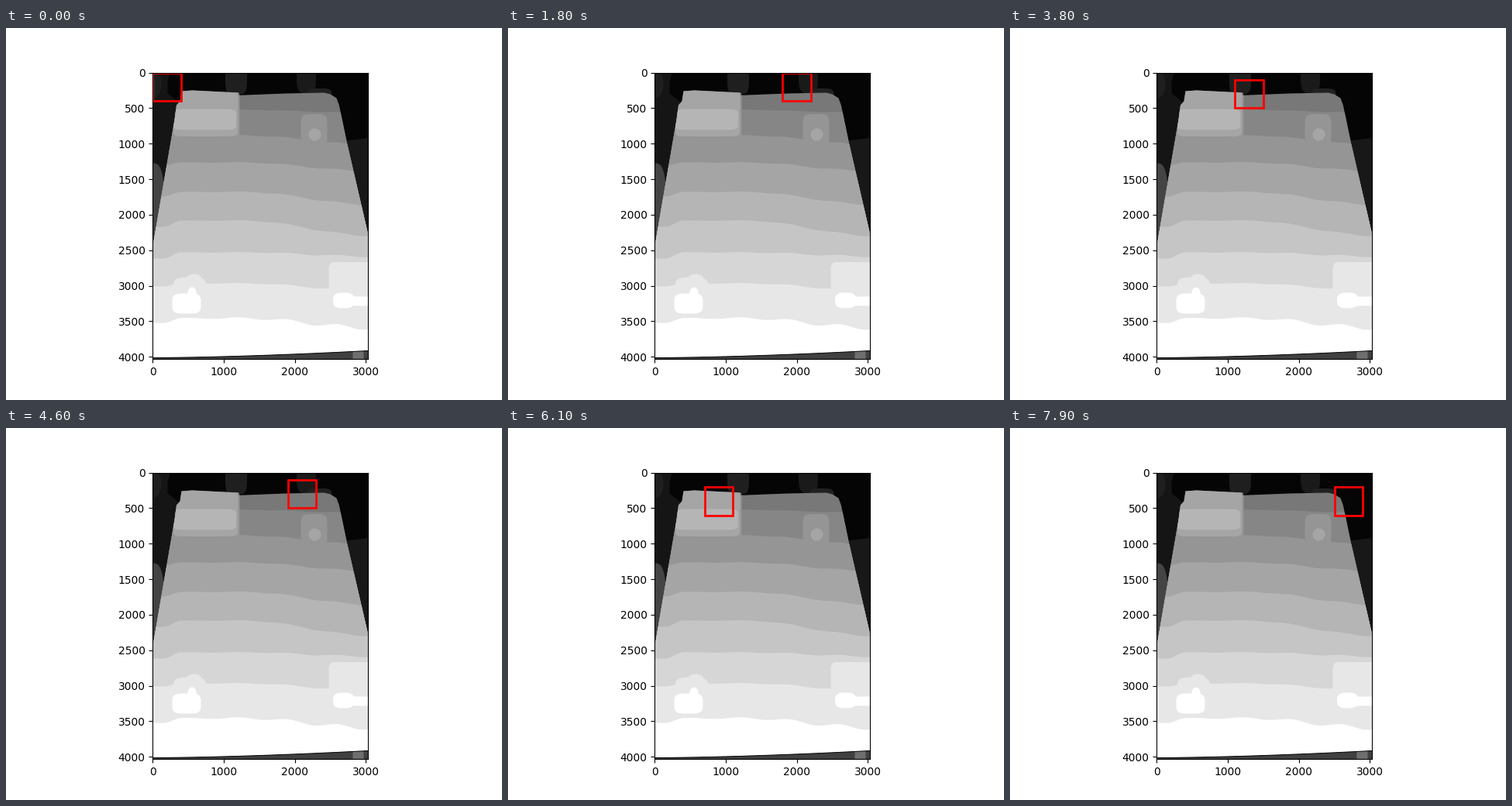
Write a matplotlib script that moves like this. It is 640 by 480 pixels and loops after 8000 ms.

```python
import numpy as np
import matplotlib.pyplot as plt
from matplotlib.animation import FuncAnimation
from matplotlib.patches import Polygon, Rectangle

W, H = 3024, 4032          # size of the depth map
WINDOW, STEP = 400, 100    # sliding window and its stride
PER_ROW = (W - WINDOW) // STEP + 1

fig, ax = plt.subplots(figsize=(6.4, 4.8), dpi=100)
ax.set_xlim(-0.5, W - 0.5)
ax.set_ylim(H - 0.5, -0.5)
ax.set_aspect("equal")
ax.set_xticks(range(0, W, 1000))
ax.set_yticks(range(0, H, 500))

# Shapes are given by pixel centres on the stage, then mapped to axes units.
LEFT, TOP, SCALE = 188.9, 57.1, H / 369.6
xs = np.linspace(185, 470, 286)


def to_data(points):
    return (np.array(points, float) - (LEFT, TOP)) * SCALE - 0.5


def gray(level):
    return (level / 255,) * 3


def shape(level, points, clip=None):
    patch = Polygon(to_data(points), facecolor=gray(level), lw=0, zorder=0.5)
    ax.add_patch(patch)
    if clip is not None:
        patch.set_clip_path(clip)
    return patch


def blob(level, cx, cy, w, h, power=2, clip=None):
    """Superellipse: an oval at power 2, a rounded box at higher powers."""
    a = np.linspace(0, 2 * np.pi, 121)
    c, s = np.cos(a), np.sin(a)
    x = cx + w / 2 * np.sign(c) * np.abs(c) ** (2 / power)
    y = cy + h / 2 * np.sign(s) * np.abs(s) ** (2 / power)
    shape(level, np.column_stack([x, y]), clip)


def smoothstep(x, a, b):
    t = np.clip((x - a) / (b - a), 0, 1)
    return t * t * (3 - 2 * t)


def band(level, left, mid, right, ripple=1.2):
    """Fill the sheet downwards from a gently rippled edge."""
    y = left + (mid - left) * smoothstep(xs, 202, 226)
    y += (right - mid) * smoothstep(xs, 310, 465)
    y += ripple * (xs - 190) / 277 * np.cos(2 * np.pi * (xs - 265) / 65)
    edge = np.column_stack([xs, y])
    shape(level, np.vstack([edge, [(470, 430), (185, 430)]]), sheet)


# Dark surroundings
ax.set_facecolor(gray(5))
shape(21, [(185, 50), (213, 50), (208, 69), (208, 84), (222, 95), (222, 300), (185, 300)])
blob(31, 189, 72, 22, 36)
blob(68, 189, 240, 30, 132, 3)
blob(31, 296.5, 63, 28, 44, 4)
blob(26, 387, 63, 25, 42, 3)
blob(33, 404, 88, 32, 21, 4)
shape(24, [(430, 146), (470, 141), (470, 290), (430, 290)])

# Floor strip, then the sheet that stands on it
foot = 424.3 - 9 * np.clip((xs - 190) / 277, 0, 1) ** 1.6
shape(64, [(185, 410), (470, 410), (470, 430), (185, 430)])
blob(110, 454, 420, 14, 24, 8)

outline = [(185, 304), (203, 199), (217, 118), (219.5, 99), (224, 94), (226, 81),
           (240, 80), (300, 83), (301, 86.3), (360, 84), (410, 83), (418, 85),
           (426, 90), (429.3, 99), (439.3, 147), (470, 280)]
sheet = shape(120, np.vstack([outline, np.column_stack([xs, foot])[::-1]]))

# Near half of the bands lies over the far half
band(134, 105, 105, 109, 0.5)
band(149, 124, 138, 150)
blob(149, 397, 132, 34, 43, 5)
blob(165, 398, 137, 16, 16)

# Box in the far left corner
shape(149, [(290, 90), (301, 86), (301, 139), (290, 139)], sheet)
blob(165, 257, 108, 84, 63, 12, sheet)
blob(181, 255.5, 117.5, 82, 27, 8, sheet)

band(165, 177, 173, 184)
band(181, 217, 211, 227)
band(197, 256, 248, 267)
band(214, 297, 289, 294)
band(231, 333, 329, 338)
blob(231, 236.5, 331, 42, 20, 3)
blob(231, 242, 323, 20, 12)
blob(231, 450, 335, 68, 67, 12, sheet)
band(255, 380, 374, 386, 3)

# Brightest spots
blob(255, 232.5, 355, 37, 26, 4)
blob(255, 239.5, 344, 12, 20)
blob(255, 435, 351, 27, 20, 3)
blob(255, 455, 352, 40, 12, 6)

# Shadow along the sheet's foot
line = to_data(np.column_stack([xs, foot + 0.7]))
ax.plot(*line.T, color=gray(12), lw=0.7, zorder=0.6, scalex=False, scaley=False)

window = Rectangle((0, 0), WINDOW, WINDOW, lw=2, edgecolor="r", facecolor="none")
ax.add_patch(window)


def update(i):
    row, col = divmod(i, PER_ROW)
    window.set_xy((col * STEP, row * STEP))
    return [window]


anim = FuncAnimation(fig, update, frames=80, interval=100, repeat=True, repeat_delay=0)
plt.show()
```
